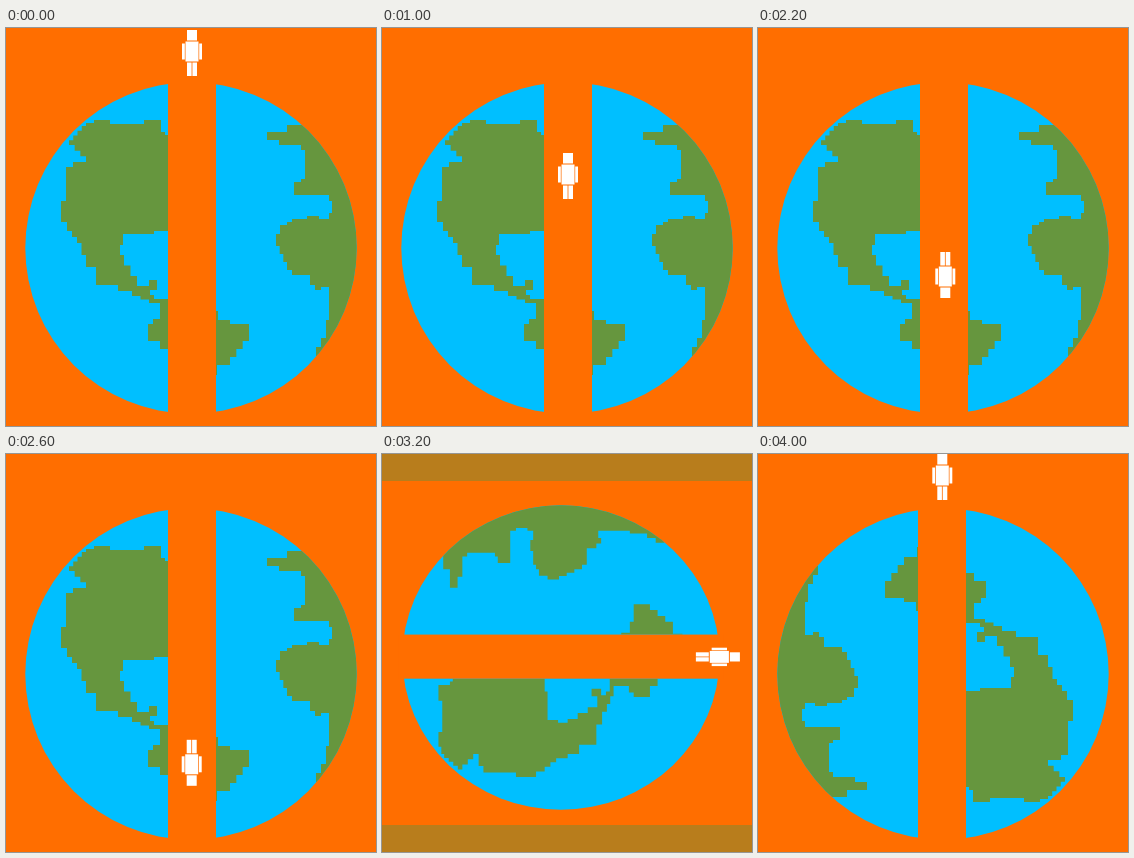
Animation, 370 px wide and 398 px high, one loop 4200 ms. Source, as an HTML page:

```html
<!DOCTYPE html>
<html lang="en">
<head>
<meta charset="utf-8">
<title>Falling through the Earth</title>
<style>
html, body { margin: 0; width: 100%; height: 100%; overflow: hidden; background: #ff6e00; }
svg { display: block; width: 370px; height: 398px; }
.sea { fill: #00bfff; }
.land { fill: #66963e; }
.gap { fill: #ff6e00; }
.bands { fill: #b87d1c; }
.man { fill: #fff; }
</style>
</head>
<body>
<svg viewBox="0 0 370 398">
  <defs>
    <clipPath id="disc"><circle cx="185" cy="220" r="165.7"/></clipPath>
  </defs>
  <g id="world">
    <circle class="sea" cx="185" cy="220" r="165.7"/>
    <g class="land" clip-path="url(#disc)">
      <path id="north"/>
      <path id="south"/>
      <path id="east"/>
    </g>
    <rect class="gap" x="162" y="50" width="48" height="340"/>
    <g id="man" class="man">
      <rect x="-5" y="-23" width="10" height="10.5"/>
      <rect x="-6.5" y="-11.5" width="13" height="20"/>
      <rect x="-10" y="-9.5" width="2.8" height="16"/>
      <rect x="7.2" y="-9.5" width="2.8" height="16"/>
      <rect x="-5" y="9.5" width="4.6" height="13.5"/>
      <rect x=".4" y="9.5" width="4.6" height="13.5"/>
    </g>
  </g>
  <g id="bands" class="bands" visibility="hidden">
    <rect width="370" height="27"/>
    <rect y="371" width="370" height="27"/>
  </g>
</svg>
<script>
const STEP = 200, LOOP = 4200;
const el = id => document.getElementById(id);
const world = el('world'), man = el('man'), bands = el('bands');

// Blocky coast: each leg runs across, then down or up, in n equal stairs
function coast(id, x, y, legs) {
  let d = `M ${x} ${y}`;
  for (const [toX, toY, n = 1] of legs) {
    for (let i = 1; i <= n; i++) {
      d += ` H ${x + (toX - x) * i / n} V ${y + (toY - y) * i / n}`;
    }
    [x, y] = [toX, toY];
  }
  el(id).setAttribute('d', d + ' Z');
}

coast('north', 162, 107, [
  [159, 104], [155, 92], [138, 96], [104, 92], [88, 95], [80, 98],
  [63, 117, 4], [80, 134, 3], [67, 139], [60, 173], [55, 194], [61, 203],
  [71, 215, 2], [80, 239, 2], [90, 257], [112, 263], [126, 268], [143, 275, 2],
  [154, 291], [147, 296], [142, 313], [154, 321], [162, 271],
  [148, 267], [144, 262], [151, 252], [143, 258], [131, 248],
  [118, 227, 2], [114, 217], [117, 206], [148, 203], [162, 203]
]);
coast('south', 210, 283, [
  [212, 292], [224, 296], [243, 313], [224, 337, 3], [211, 347], [210, 347]
]);
coast('east', 360, 97, [
  [281, 104], [261, 112], [273, 117], [295, 122], [299, 151], [295, 154],
  [288, 167], [323, 173], [326, 185], [323, 191], [313, 188], [301, 191],
  [286, 194], [281, 197], [274, 206], [270, 218], [281, 242, 3], [286, 247],
  [304, 257], [309, 262], [315, 259], [323, 292], [320, 310], [310, 328, 2],
  [360, 328]
]);

// Height of the figure's centre in globe coordinates
function fall(k) {
  if (k < 3) return 25 + 29 * k;
  if (k < 6) return 104 + 22 * (k - 3);
  if (k < 11) return k < 8 ? 188 : k < 9 ? 213 : 232;
  if (k < 16) return 247 + 30.9 * (k - 11);
  return k < 18 ? 384 + 16 * (k - 16) : k < 20 ? 412 : 417;
}
const tilt = k => k < 6 ? 0 : k < 8 ? -45 : k < 9 ? -90 : k < 11 ? -135 : -180;
const drift = k => k < 8 ? 186 : k < 12 ? 187.3 : 185.7;

// Upright, quarter turn (squeezed to fit), upside down
const views = ['', 'matrix(0 -.9187 .957 0 -31.6 373.5)', 'matrix(-1 0 0 -1 370 440)'];

let last = -1;
function draw() {
  const k = Math.floor(performance.now() % LOOP / STEP);
  if (k !== last) {
    last = k;
    const view = k < 16 ? 0 : k < 17 ? 1 : 2;
    world.setAttribute('transform', views[view]);
    bands.setAttribute('visibility', view === 1 ? 'visible' : 'hidden');
    man.setAttribute('transform', `translate(${drift(k)} ${fall(k)}) rotate(${tilt(k)})`);
  }
  requestAnimationFrame(draw);
}
draw();
</script>
</body>
</html>
```
